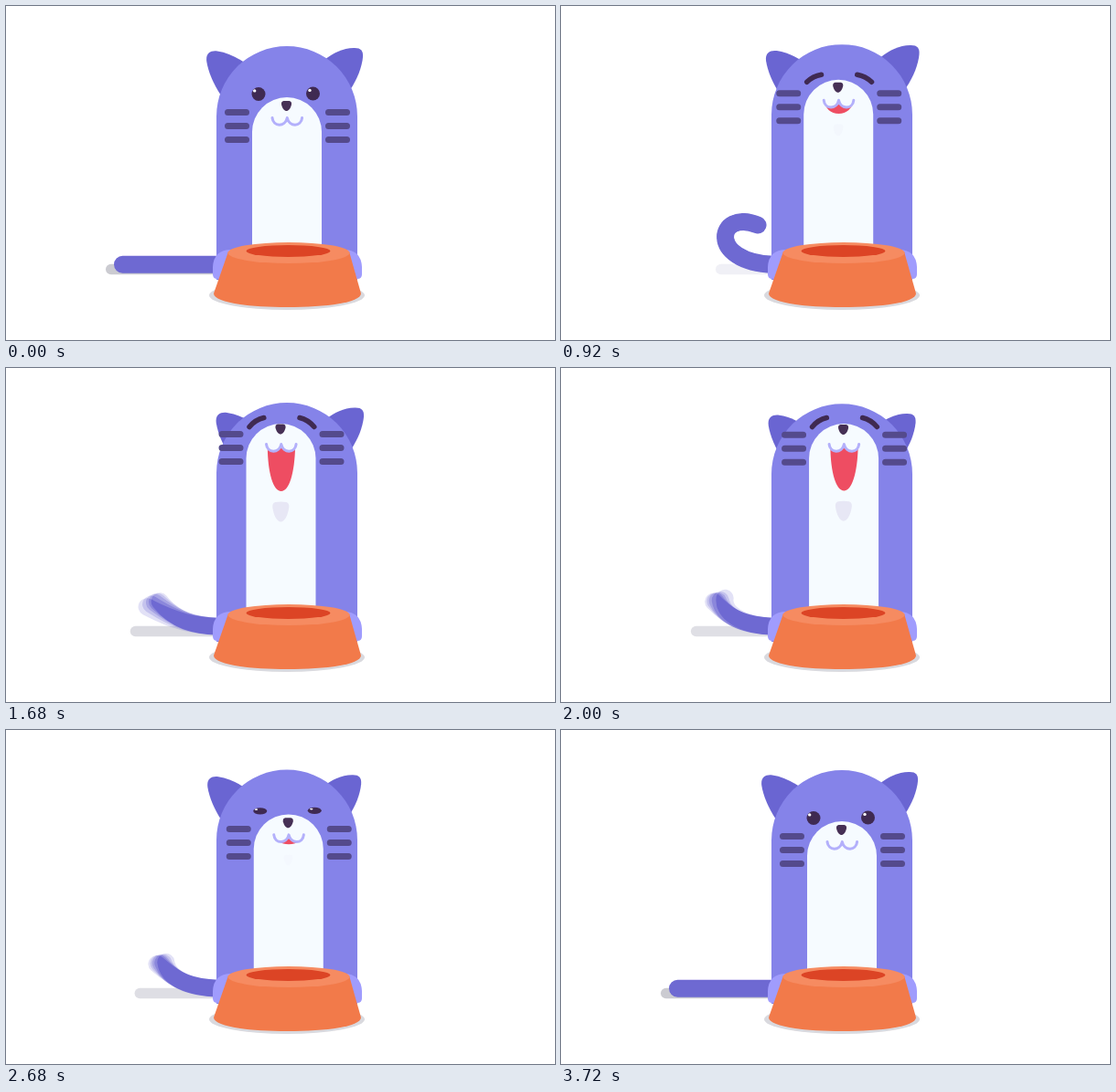
Recreate the animation shown at these times as an HTML page. Size 600 by 366 pixels, loop 4000 ms.

```html
<!DOCTYPE html>
<html lang="en">
<head>
<meta charset="utf-8">
<title>Hungry cat</title>
<style>
html, body { margin: 0; width: 100%; height: 100%; overflow: hidden; background: #fff; }
svg { display: block; width: 600px; height: 366px; }
#tail { isolation: isolate; }
#tail path { mix-blend-mode: plus-lighter; opacity: .2; }
</style>
</head>
<body>
<svg viewBox="0 0 600 366" fill="none" stroke-linecap="round" stroke-linejoin="round">
  <line id="tailShadow" x2="240" y1="288.5" y2="288.5" stroke-width="11.5"/>
  <g id="tail" stroke="#6a65d2" stroke-width="19"></g>

  <g fill="#6a65d2">
    <path id="earL" d="M235 98C227 86 221 72 219.3 61C218 52 223 48.5 231 49.5C242 51 252 56 262 63L262 98Z"/>
    <path id="earR" d="M348 59C358 51 368 46.5 380 46C388 45.7 390.5 49 390 56C389 67 384 80 376 92L348 92Z"/>
  </g>
  <path id="body" fill="#8583e9"/>
  <path id="muzzle" fill="#f6fbff"/>

  <g id="whiskers" stroke="#544a8c" stroke-width="7">
    <path d="M242.5 116.5h20M242.5 131.5h20M242.5 146.5h20M352.5 116.5h20M352.5 131.5h20M352.5 146.5h20"/>
  </g>

  <g id="openEyes">
    <g id="eyeL"><circle r="7.5" fill="#3f2a52"/><circle cx="-4.3" cy="-3.6" r="1.7" fill="#fff"/></g>
    <g id="eyeR"><circle r="7.5" fill="#3f2a52"/><circle cx="-3.5" cy="-3.6" r="1.7" fill="#fff"/></g>
  </g>
  <path id="shutEyes" stroke="#3f2a52" stroke-width="5.5"/>

  <path id="nose" fill="#463055" d="M303.5 104H309.5Q312.5 104.500 312 108C311 112.500 308.500 115 306.500 115S302 112.500 301 108Q300.500 104.500 303.500 104Z"/>
  <g id="mouth">
    <path id="gape" fill="#ee4d62"/>
    <path stroke="#b3b0fb" stroke-width="3" d="M291 122.500C292 132.500 305 133 307.300 122.500C309.600 133 322.600 132.500 323.600 122.500"/>
    <path id="chin" fill="#e7e7f5" d="M-6 .4Q0 -.6 6 .4Q9.500 1.500 9 6C8 15 4 22 0 22S-8 15 -9 6Q-9.500 1.500 -6 .4Z"/>
  </g>

  <g fill="#a09cfd">
    <path d="M226 294V286Q227 267 246 267V299H231Q226 299 226 294Z"/>
    <path d="M389 294V286Q388 267 369 267V299H384Q389 299 389 294Z"/>
  </g>
  <ellipse cx="307" cy="317" rx="85" ry="16" fill="#d9d9de"/>
  <path fill="#f27a4a" d="M243 269L227 315C227 325 265 330 307.500 330S388 325 388 315L375 269Z"/>
  <ellipse cx="309" cy="270.500" rx="66.500" ry="11.500" fill="#f68b61"/>
  <ellipse cx="308.500" cy="268.500" rx="46" ry="6.500" fill="#dc4425"/>
</svg>
<script>
const LOOP = 4000, SHUTTER = 26, COPIES = 5;
const $ = id => document.getElementById(id);
const set = (id, name, value) => $(id).setAttribute(name, value);
const move = (id, x, y) => set(id, 'transform', `translate(${x} ${y})`);

// Smooth curve through (xs, ys) that never overshoots its points.
function curve(xs, ys) {
  const n = xs.length;
  const slope = i => (ys[i + 1] - ys[i]) / (xs[i + 1] - xs[i]);
  const tangent = xs.map((_, i) => {
    if (i === 0 || i === n - 1) return 0;
    const a = slope(i - 1), b = slope(i);
    return a * b > 0 ? 2 * a * b / (a + b) : 0;
  });
  return x => {
    if (x <= xs[0]) return ys[0];
    if (x >= xs[n - 1]) return ys[n - 1];
    let i = 0;
    while (x > xs[i + 1]) i++;
    const h = xs[i + 1] - xs[i], u = (x - xs[i]) / h, v = 1 - u;
    return ys[i] * (1 + 2 * u) * v * v + tangent[i] * h * u * v * v
      + ys[i + 1] * u * u * (3 - 2 * u) - tangent[i + 1] * h * u * u * v;
  };
}

// Head tracks over time
const beats = [0, 600, 1240, 1680, 2280, 2840];
const track = (...ys) => curve(beats, ys);
const headX = track(0, -1.3, -6, -6.5, 9, 0);
const muzzleY = track(0, -10, -29, -39, -39, 0);
const faceY = track(0, -10.5, -32, -44, -41.5, 0);
const topY = track(0, 0, -4.5, -6, -3, 0);
const earBeats = [...beats.slice(0, 5), 3000];
const earLX = curve(earBeats, [0, 2, 8, 10.5, 4, 0]);
const earLY = curve(earBeats, [0, 0.6, -1.5, -0.5, 4, 0]);
const earRX = curve(earBeats, [0, 0, 3, 1, -4.5, 0]);
const earRY = curve(earBeats, [0, 0, -6, -2.5, 8, 0]);
const gape = curve([680, 1240, 1680, 2280, 2800], [0, 32, 47, 45, 0]);
const shut = curve([760, 960, 2560, 2740], [0, 1, 1, 0]);
const blink = curve([3420, 3540, 3580, 3700], [0, 1, 1, 0]);

// Tail: curl amount over time, then control points over curl
const curl = curve(
  [0, 310, 610, 920, 1235, 1520, 1820, 2160, 2500, 2850, 3190, 3460, 3720],
  [0, 1, 0, 1, 0.583, 1, 0, 1, 0, 1, 0, 1, 0]);
const curls = [0, 0.233, 0.45, 0.583, 0.683, 1];
const tailPoints = [
  [197, 200, 205, 200, 168, 160], [283.5, 283.5, 282, 282, 281, 281],
  [162, 165, 190, 177, 176, 170], [283.5, 276, 278, 272, 238, 222],
  [127.5, 136, 163, 175, 197, 215], [283.3, 275.5, 257, 254.3, 241, 240]
].map(ys => curve(curls, ys));

const tails = Array.from({ length: COPIES }, () =>
  $('tail').appendChild(document.createElementNS('http://www.w3.org/2000/svg', 'path')));

function drawTail(t) {
  tails.forEach((el, i) => {
    const a = curl(t + SHUTTER * (i / (COPIES - 1) - 0.5));
    const p = tailPoints.map(f => f(a).toFixed(2)).join(' ');
    el.setAttribute('d', `M240 283.5L232 283.3C${p}`);
  });
  const a = curl(t), g = Math.round(203 + 37 * a);
  set('tailShadow', 'x1', 114.75 + 60 * a);
  set('tailShadow', 'stroke', `rgb(${g},${g},${g + 6})`);
}

function drawEyes(t, x, y) {
  const c = shut(t), open = c < 0.5;
  const sy = Math.max(0.12, 1 - 2 * c) * (1 - 0.88 * blink(t));
  set('openEyes', 'visibility', open ? 'visible' : 'hidden');
  set('shutEyes', 'visibility', open ? 'hidden' : 'visible');
  set('eyeL', 'transform', `translate(${276 + x} ${96.5 + y}) scale(1 ${sy})`);
  set('eyeR', 'transform', `translate(${335.5 + x} ${96 + y}) scale(1 ${sy})`);
  const k = 2 * c - 1;
  const lo = 98 + 5.5 * k, hi = 98 - 4.5 * k, mid = 98 - 2.5 * k;
  set('shutEyes', 'd', `M272.5 ${lo}Q279 ${mid} 288.3 ${hi}M327.5 ${hi}Q336.5 ${mid} 343.3 ${lo}`);
}

function drawMouth(t, x, y) {
  const o = gape(t), b = 127 + o, side = 125 + 0.62 * o, size = 0.47 + 0.53 * o / 47;
  move('mouth', x, y);
  set('gape', 'visibility', o > 3 ? 'visible' : 'hidden');
  set('gape', 'd', `M292.3 125C296 133 304 131 307.3 123C310.6 131 319 133 322.6 125` +
    `C322 ${side} 316 ${b} 307.3 ${b}S292.6 ${side} 292.3 125Z`);
  set('chin', 'transform', `translate(306.8 ${b + 11.5}) scale(${size})`);
  set('chin', 'opacity', Math.min(1, o / 45));
}

function draw(t) {
  const x = headX(t), m = muzzleY(t), f = faceY(t), top = 121 + topY(t);
  drawTail(t);
  move('earL', earLX(t), earLY(t));
  move('earR', earRX(t), earRY(t));
  set('body', 'd', `M230 300V${top}A77 77 0 0 1 384 ${top}V300Z`);
  set('muzzle', 'd', `M${269 + x} 290V${138 + m}a38 38 0 0 1 76 0V290Z`);
  move('whiskers', x, f);
  move('nose', x, 0.7 * f + 0.3 * m);
  drawEyes(t, x, m);
  set('shutEyes', 'transform', `translate(${x} ${m})`);
  drawMouth(t, x, m);
}

const start = performance.now();
function tick() {
  draw((performance.now() - start) % LOOP);
  requestAnimationFrame(tick);
}
draw(0);
requestAnimationFrame(tick);
</script>
</body>
</html>
```
